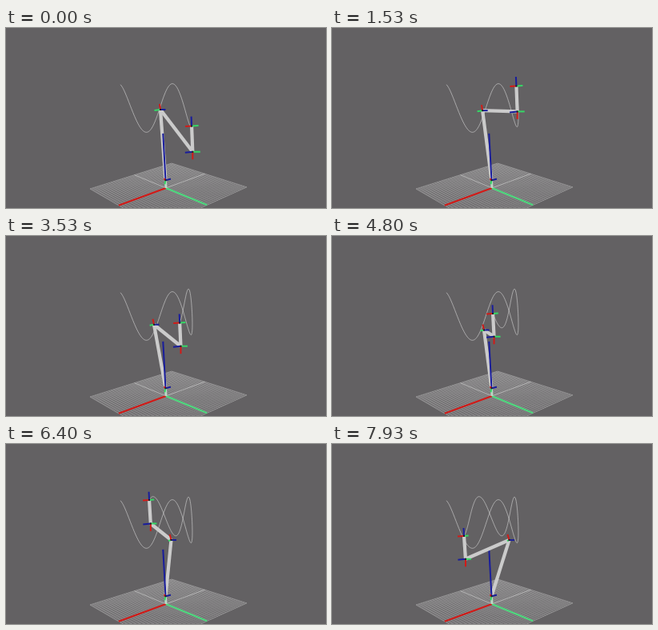
Recreate the animation shown at these times as an HTML page with a canvas. Size 400 by 225 pixels, loop 8 s.

```html
<!DOCTYPE html>
<html>
<head>
<meta charset="utf-8">
<style>
  html, body { margin: 0; width: 100%; height: 100%; overflow: hidden; background: #636163; }
  canvas { display: block; width: 100vw; height: 100vh; }
</style>
</head>
<body>
<canvas id="stage" width="400" height="225"></canvas>
<script>
const ctx = document.getElementById('stage').getContext('2d');
const LOOP = 8000, STEP = 1000 / 15, DEG = Math.PI / 180;
const RED = '#d31a17', GREEN = '#35d866', BLUE = '#191d9c', LINK = '#cbcbcb';
const TOOL = 0.445, TRAIL_START = 10;

// Perspective: the floor spans -1..1 in x and y, z points up.
function project(x, y, z) {
  const w = 1 - 0.0997 * x - 0.13 * y - 0.0295 * z;
  return [
    (200 - 73.2 * x + 18.6 * y - 9.5 * z) / w,
    (200 - 0.37 * x - 7.5 * y - 72 * z) / w
  ];
}

// Point on the tool path: a narrowing, slightly tilted circle with a vertical wave.
function pathPoint(phase, drop = 0) {
  const turn = (phase - 248) / 4.57 * DEG;
  const radius = 0.69 - 0.0001 * phase;
  const side = -0.1 + radius * Math.sin(turn);
  const front = -0.05 + radius * Math.cos(turn);
  const z = 1.52 - 0.04 * side + 0.02 * front + 0.37 * Math.cos(phase * DEG) - drop;
  return project(-0.793 * side + 0.608 * front, 0.608 * side + 0.793 * front, z);
}

// Elbow keys: seconds, x, y
const elbowKeys = [
  [0, 193, 102], [1.53, 188, 103.3], [3.53, 185, 111], [4.8, 190, 117.5],
  [5.73, 198, 118.5], [7, 214, 121], [7.93, 222, 120]
];

function elbowAt(t) {
  const last = elbowKeys.length - 1;
  let i = 0;
  while (i < last - 1 && t > elbowKeys[i + 1][0]) i++;
  const a = elbowKeys[i], b = elbowKeys[i + 1];
  const span = b[0] - a[0], u = Math.min((t - a[0]) / span, 1);
  const slope = (k, axis) => {
    const p = elbowKeys[Math.max(k - 1, 0)], q = elbowKeys[Math.min(k + 1, last)];
    return (q[axis] - p[axis]) / (q[0] - p[0]) * span;
  };
  return [1, 2].map(axis =>
    (1 + 2 * u) * (1 - u) ** 2 * a[axis] + u * (1 - u) ** 2 * slope(i, axis) +
    u * u * (3 - 2 * u) * b[axis] + u * u * (u - 1) * slope(i + 1, axis));
}

function line(points, color, width) {
  ctx.beginPath();
  points.forEach(p => ctx.lineTo(p[0], p[1]));
  ctx.strokeStyle = color;
  ctx.lineWidth = width;
  ctx.stroke();
}

function gizmo([x, y], red, green, blue) {
  const arm = (d, color) => line([[x, y], [x + d[0], y + d[1]]], color, 2);
  arm(green, GREEN);
  arm(red, RED);
  arm(blue, BLUE);
  ctx.fillStyle = '#222';
  ctx.fillRect(x - 1, y - 1, 2, 2);
}

function drawFloor() {
  const cells = 40;
  for (let i = 0; i <= cells; i++) {
    const v = i / cells * 2 - 1;
    const color = i % cells ? 'rgba(205,205,205,.55)' : 'rgba(205,205,205,.8)';
    line([project(v, -1, 0), project(v, 1, 0)], color, 0.55);
    line([project(-1, v, 0), project(1, v, 0)], color, 0.55);
  }
  const origin = project(0, 0, 0);
  line([project(-1, 0, 0), origin], '#bbb', 0.9);
  line([project(0, -1, 0), origin], '#bbb', 0.9);
  line([origin, project(1, 0, 0)], RED, 2);
  line([origin, project(0, 1, 0)], '#4fd97f', 2);
}

function drawTrail(phase) {
  const points = [];
  for (let p = TRAIL_START; p < phase; p += 5) points.push(pathPoint(p));
  points.push(pathPoint(phase));
  line(points, 'rgba(210,210,210,.8)', 0.8);
}

function drawArm(t, phase) {
  const base = project(0, 0, 0), shoulder = project(0, 0, 0.147);
  const elbow = elbowAt(t), wrist = pathPoint(phase, TOOL), tip = pathPoint(phase);
  const u = t / 8;

  line([shoulder, elbow], LINK, 4.2);
  line([base, project(0, 0, 1)], BLUE, 2);
  line([base, shoulder], '#bcd8c4', 3);
  line([elbow, wrist], LINK, 4.4);
  line([wrist, tip], LINK, 4.2);

  gizmo(shoulder, [-2, -2], [-1, 5], [6.5, -1.5]);
  gizmo(elbow, [-1 - u, -7], [-7.5 + 5 * u, 1], [6.5, 0]);
  gizmo(wrist, [0, 9.5], [9.5 - 2.5 * u, 0], [-9.5, 1]);
  gizmo(tip, [-8, 0.5], [8.5 - 3 * u, -0.5], [-0.5, -12 + 2 * u]);
}

function draw(now) {
  const t = Math.floor((now % LOOP) / STEP + 0.01) * STEP / 1000;
  const phase = 552 + 87.8 * t;
  ctx.fillStyle = '#636163';
  ctx.fillRect(0, 0, 400, 225);
  drawFloor();
  drawTrail(phase);
  drawArm(t, phase);
}

let start;
function tick(now) {
  start ??= now;
  draw(now - start);
  requestAnimationFrame(tick);
}
draw(0);
requestAnimationFrame(tick);
</script>
</body>
</html>
```
